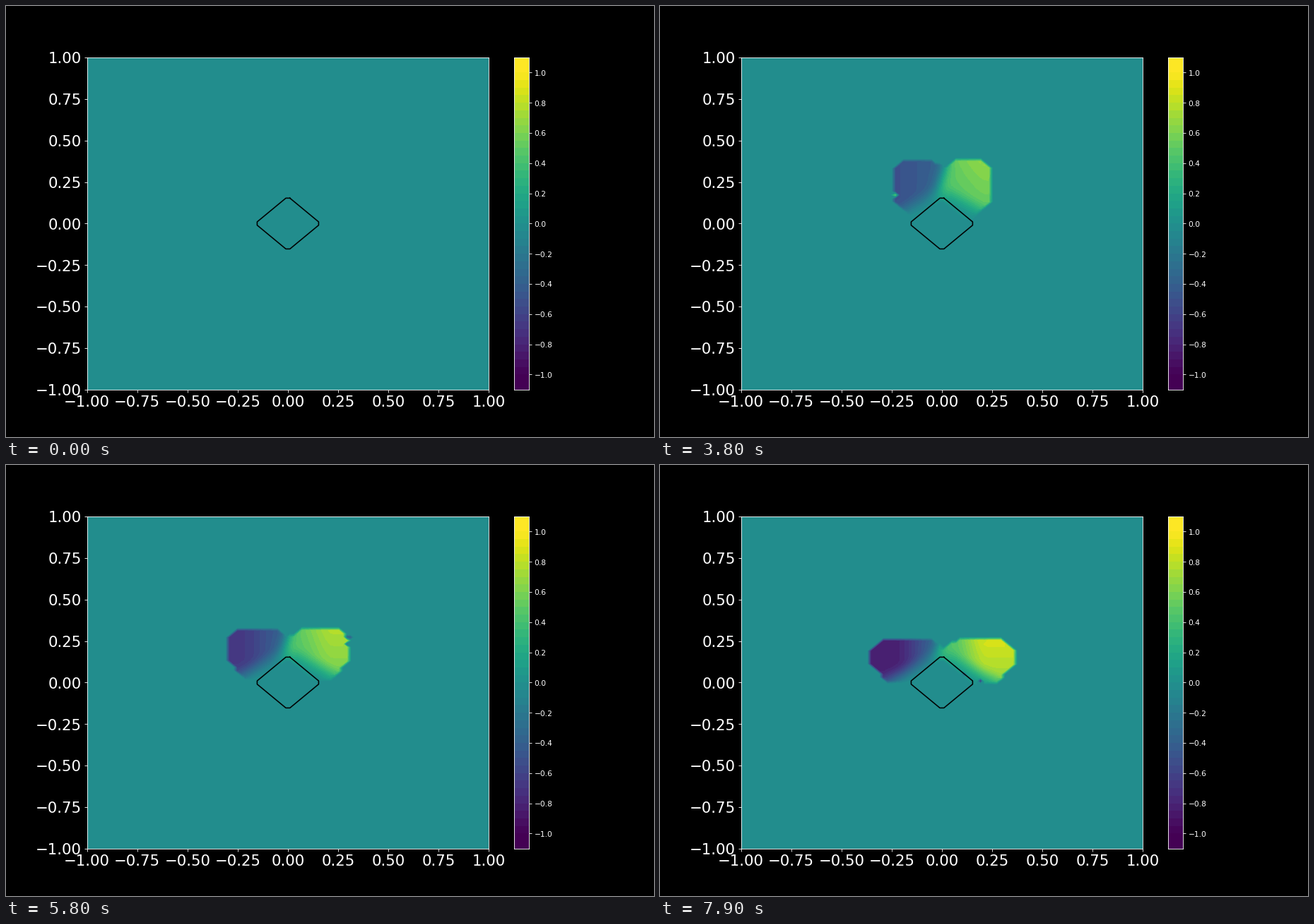
A matplotlib script that plays this animation: 917 by 611 pixels, repeating every 8000 ms.

```python
import numpy as np
import matplotlib.pyplot as plt
from matplotlib.animation import FuncAnimation
from matplotlib.colors import Normalize

FRAMES, STEP = 80, 100
LEVELS = np.linspace(-1.1, 1.1, 45)
STYLE = dict(cmap="viridis", norm=Normalize(-1, 1))

plt.style.use("dark_background")
plt.rcParams["font.family"] = "DejaVu Sans"
fig = plt.figure(figsize=(12, 8), dpi=76.42)  # 917 x 611 pixels
ax = fig.add_axes([.125, .11, .62, .77])
ax.tick_params(labelsize=20)
ax.set(xlim=(-1, 1), ylim=(-1, 1))

ticks = np.arange(-10, 11, 2) / 10
bar = fig.add_axes([.78375, .11, .0233, .77])
bar.pcolormesh([0, 1], LEVELS, (LEVELS[1:, None] + LEVELS[:-1, None]) / 2,
               **STYLE)
bar.yaxis.tick_right()
bar.set(xticks=[], ylim=(-1.1, 1.1))
bar.set_yticks(ticks, [f"{v:.1f}".replace("-", "\u2212") for v in ticks])
bar.tick_params(labelsize=10)

# solid body: a diamond with clipped tips
a, b = .0101, .153
ax.plot([a, b, b, a, -a, -b, -b, -a, a], [b, a, -a, -b, -b, -a, a, b, b],
        color="black", lw=1.5, zorder=3)

# grid, and its nodes in stage pixels (x measured from the centre line)
axis = np.linspace(-1, 1, 100)
GX, GY = np.meshgrid(axis, axis)
DX, PY = GX * 284.3, 308.6 - GY * 235.2
REACH = np.abs(DX)
BODY = np.abs(GX) + np.abs(GY) < .155


def smooth(x):
    x = np.clip(x, 0, 1)
    return x * x * (3 - 2 * x)


def top_edge(t):
    return 212 + 35 * (max(t - 1, 0) / 6.9) ** 1.7


def wake(t):
    """Nodes covered by the wake, which widens and sinks over time."""
    top, bottom = top_edge(t), 290 + 2.6 * t
    over = REACH - max(46, 36 + 8.2 * t)
    cut = 1 + 1.9 * t
    notch = min(2.5 * t, 13) - .6 * np.abs(DX - 4)
    return ((over < 0) & (PY > top + np.maximum(notch, 0)) & (PY < bottom)
            & (over + top - PY < -cut) & (over + PY - bottom < -18 - cut / 2)
            & ~BODY)


def flow(t):
    """Two counter-rotating lobes, negative left and positive right."""
    side = DX - 3 + .3 * np.clip(PY - 230, 0, 45)
    early = max(0, 1 - t / 3)
    right = (.45 + .05 * t) * (1.05 - (.004 + .01 * early) * (PY - top_edge(t)))
    left = .22 + .075 * t
    spread = .45 * np.clip((t - 1.5) / 6.4, 0, 1)
    v = np.where(side > 0, right, left) * np.tanh(side / 10)
    v *= 1 - spread + spread * smooth((REACH - 15) / 50)
    low = PY - 245 - 1.5 * t - .5 * np.maximum(REACH - 15, 0)
    return v * (1 - smooth(low / 40)) * min(1, t / .5)


def add_spots(z, inside, rng):
    """Short-lived extreme nodes on the rim of the wake."""
    core = inside.copy()
    for shift, dim in ((1, 0), (-1, 0), (1, 1), (-1, 1)):
        core &= np.roll(inside, shift, dim)
    rim = np.argwhere(inside & ~core & (PY > 225))
    for j, i in rng.choice(rim, rng.integers(1, 4)):
        size = rng.choice([.4, .8, 2.5])
        z[j, i:i + rng.integers(1, 3)] = size * rng.choice([-1, 1])


def field(n):
    z = np.zeros_like(GX)
    if n:
        t = n * STEP / 1000
        inside = wake(t)
        z[inside] = flow(t)[inside]
        add_spots(z, inside, np.random.default_rng(500 + n))
    return z - 1e-6  # still fluid belongs to the band just below zero


shown = []


def draw(n):
    while shown:
        shown.pop().remove()
    shown.append(ax.contourf(GX, GY, field(n), levels=LEVELS, extend="both",
                             zorder=1, **STYLE))
    return shown


anim = FuncAnimation(fig, draw, frames=FRAMES, interval=STEP,
                     init_func=lambda: draw(0), repeat=True, repeat_delay=0)
plt.show()
```
